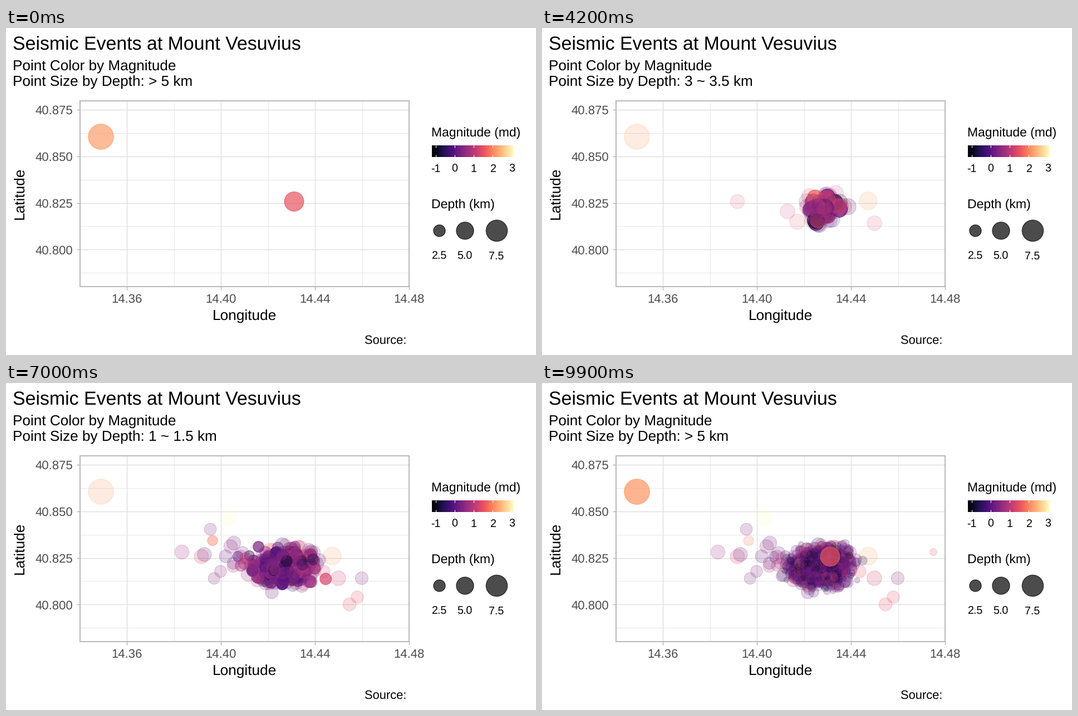
Recreate the animation shown at these times as a matplotlib script. Size 952 by 588 pixels, loop 10 s.

```python
import numpy as np
import matplotlib.pyplot as plt
from matplotlib.animation import FuncAnimation

W, H, DPI = 952, 588, 100
PX = 72 / DPI
FRAMES, INTERVAL = 100, 100
CLASSES = 11
ALPHA, SHADOW_ALPHA, STROKE = 0.7, 0.2, 1.3

plt.rcParams["font.family"] = "Liberation Sans"
plt.rcParams["text.hinting"] = "none"
magma = plt.get_cmap("magma")

LABELS = ["> 5"] + [f"{5 - i / 2:g} ~ {5.5 - i / 2:g}" for i in range(1, CLASSES)]

# Frames each depth class rests, then moves on to the next
REST = np.array([4] * 5 + [3] + [4] * 5)
MOVE = np.array([6] * 2 + [5] * 9)
ENDS = np.cumsum(REST + MOVE)

# Isolated events per depth class: x, y, magnitude
ISOLATED = {
    0: [(170.5, 195.5, 2.25), (517.5, 312, 1.55)],
    1: [(513, 312, 1.9)],
    2: [(586, 311, 2.4)],
    5: [(400, 242, 3.1), (351, 312, 1.4), (597, 351, 1.3)],
    6: [(316, 304, .8)],
    7: [(367, 263, .4), (639, 351, .5), (631, 385, 1.5), (617, 398, 1.5)],
    10: [(703, 304, 1.6)],
}


def cluster(i, rng):
    """Events around the crater: more, and more widely spread, as depth falls."""
    n = 4 + 5 * (i - 2) ** 2
    spread = min(26, 8 + 2.7 * i)
    reach = spread * np.sqrt(-2 * np.log(1 - .993 * rng.random(n)))
    angle = rng.uniform(0, 2 * np.pi, n)
    return np.column_stack([max(500, 516 - 2.5 * i) + reach * np.cos(angle),
                            min(330, 312 + 3 * i) + .63 * reach * np.sin(angle),
                            rng.normal(1 - .1 * i, .6, n)])


def western_strays(rng, n=5):
    return np.column_stack([435 - rng.exponential(30, n),
                            rng.normal(310, 18, n),
                            rng.normal(.7, .5, n)])


def make_state(i):
    """Rows of x, y, magnitude, radius for one depth class."""
    rng = np.random.default_rng(40 + i)
    isolated = np.array(ISOLATED.get(i, []), float).reshape(-1, 3)
    parts = [isolated[:1]]
    if i >= 2:
        parts.append(cluster(i, rng))
    if 6 <= i <= 8:
        parts.append(western_strays(rng))
    rows = np.vstack(parts + [isolated[1:]])
    if i == 0:
        depth = np.array([9.5, 5.2])
    else:
        depth = 5 - i / 2 + rng.random(len(rows)) / 2
    return np.column_stack([rows, 3 + 6.6 * np.sqrt(depth)])


STATES = [make_state(i) for i in range(CLASSES)]


def with_alpha(rows, alpha):
    return np.column_stack([rows, np.full(len(rows), alpha)])


def blend(a, b, k):
    """Matched rows travel, surplus rows fade out, new rows fade in."""
    n = min(len(a), len(b))
    return np.vstack([with_alpha(a[n:], ALPHA * (1 - k)),
                      with_alpha(a[:n] * (1 - k) + b[:n] * k, ALPHA),
                      with_alpha(b[n:], ALPHA * k)])


def scene(frame):
    """Label index and all rows, shadows of earlier classes first."""
    i = np.searchsorted(ENDS, frame, side="right")
    after = (i + 1) % CLASSES
    k = max(0, 1 - (ENDS[i] - 1 - frame) / MOVE[i])
    if k == 1 and after:
        i, after, k = after, after + 1, 0
    past = i + 1 if k > 0 else i
    shadows = [with_alpha(s, SHADOW_ALPHA) for s in STATES[:past]]
    live = blend(STATES[i], STATES[after % CLASSES], k)
    return (after if k > .5 else i), np.vstack(shadows + [live])


fig = plt.figure(figsize=(W / DPI, H / DPI), dpi=DPI, facecolor="white")
ax = fig.add_axes([0, 0, 1, 1])


def text(x, y, s, size, color="black", **kw):
    return ax.text(x, y, s, fontsize=size * PX, color=color,
                   rotation_mode="anchor", **kw)


def line(xs, ys, color, width, z=1):
    ax.plot(xs, ys, color=color, lw=width * PX, zorder=z, solid_capstyle="butt")


def area(r):
    return (2 * (r - STROKE / 2) * PX) ** 2


# Panel
LEFT, RIGHT, TOP, BOTTOM = 132.5, 724, 130.5, 465.2
X_STEP, Y_STEP = 169, 83.7
GRID, FRAME, TICK_TEXT = "#dedede", "#b3b3b3", "#4d4d4d"


def vertical(x, width):
    line([x, x], [TOP, BOTTOM], GRID, width)


def horizontal(y, width):
    line([LEFT, RIGHT], [y, y], GRID, width)


for n in range(4):
    x, y = 217 + X_STEP * n, 147.2 + Y_STEP * n
    if n < 3:
        vertical(x + X_STEP / 2, .7)
        vertical(x, 1.4)
    horizontal(y + Y_STEP / 2, .7)
    horizontal(y, 1.4)
    line([x, x], [BOTTOM, BOTTOM + 6], FRAME, 1.4)
    line([LEFT - 6, LEFT], [y, y], FRAME, 1.4)
    text(x, 494, f"{14.36 + .04 * n:.2f}", 22.2, TICK_TEXT, ha="center")
    text(120, y + 8, f"{40.875 - .025 * n:.3f}", 22.2, TICK_TEXT, ha="right")
ax.add_patch(plt.Rectangle((LEFT, TOP), RIGHT - LEFT, BOTTOM - TOP, fill=False,
                           ec=FRAME, lw=1.8 * PX, zorder=5))

# Titles
text(12.5, 39, "Seismic Events at Mount Vesuvius", 33.9)
text(12.5, 76.5, "Point Color by Magnitude", 26.1)
subtitle = text(12.5, 105, "", 26.1)
text(428, 525.5, "Longitude", 26.2, ha="center")
text(33, 297.8, "Latitude", 26.2, rotation=90, ha="center", va="baseline")
text(644, 567.5, "Source:", 21.9)

# Legends
text(763.5, 195.5, "Magnitude (md)", 22.9)
ax.imshow(np.linspace(0, 1, 256)[None], cmap=magma, extent=[765, 912, 232, 211],
          aspect="auto", zorder=2)
for n in range(5):
    x = 771.5 + 34.2 * n
    line([x, x], [211, 215.2], "white", 1.1, 3)
    line([x, x], [227.8, 232], "white", 1.1, 3)
    text(x, 259, str(n - 1), 19.6, ha="center")
text(763.5, 324.5, "Depth (km)", 23.0)
for x, r, s in ((778, 11.2, "2.5"), (824, 16.2, "5.0"), (881, 19.8, "7.5")):
    ax.scatter([x], [364.4], s=area(r), color=[(0, 0, 0, ALPHA)], lw=STROKE * PX)
    text(x, 416, s, 19.6, ha="center")

points = ax.scatter([], [], lw=STROKE * PX, zorder=4)
ax.set_xlim(0, W)
ax.set_ylim(H, 0)
ax.axis("off")


def update(frame):
    label, rows = scene(frame)
    colors = magma(np.clip((rows[:, 2] + 1.18) / 4.3, 0, 1))
    colors[:, 3] = rows[:, 4]
    points.set_offsets(rows[:, :2])
    points.set_sizes(area(rows[:, 3]))
    points.set_facecolor(colors)
    points.set_edgecolor(colors)
    subtitle.set_text(f"Point Size by Depth: {LABELS[label]} km")
    return points, subtitle


anim = FuncAnimation(fig, update, frames=FRAMES, interval=INTERVAL,
                     repeat=True, repeat_delay=0, blit=False)
plt.show()
```
